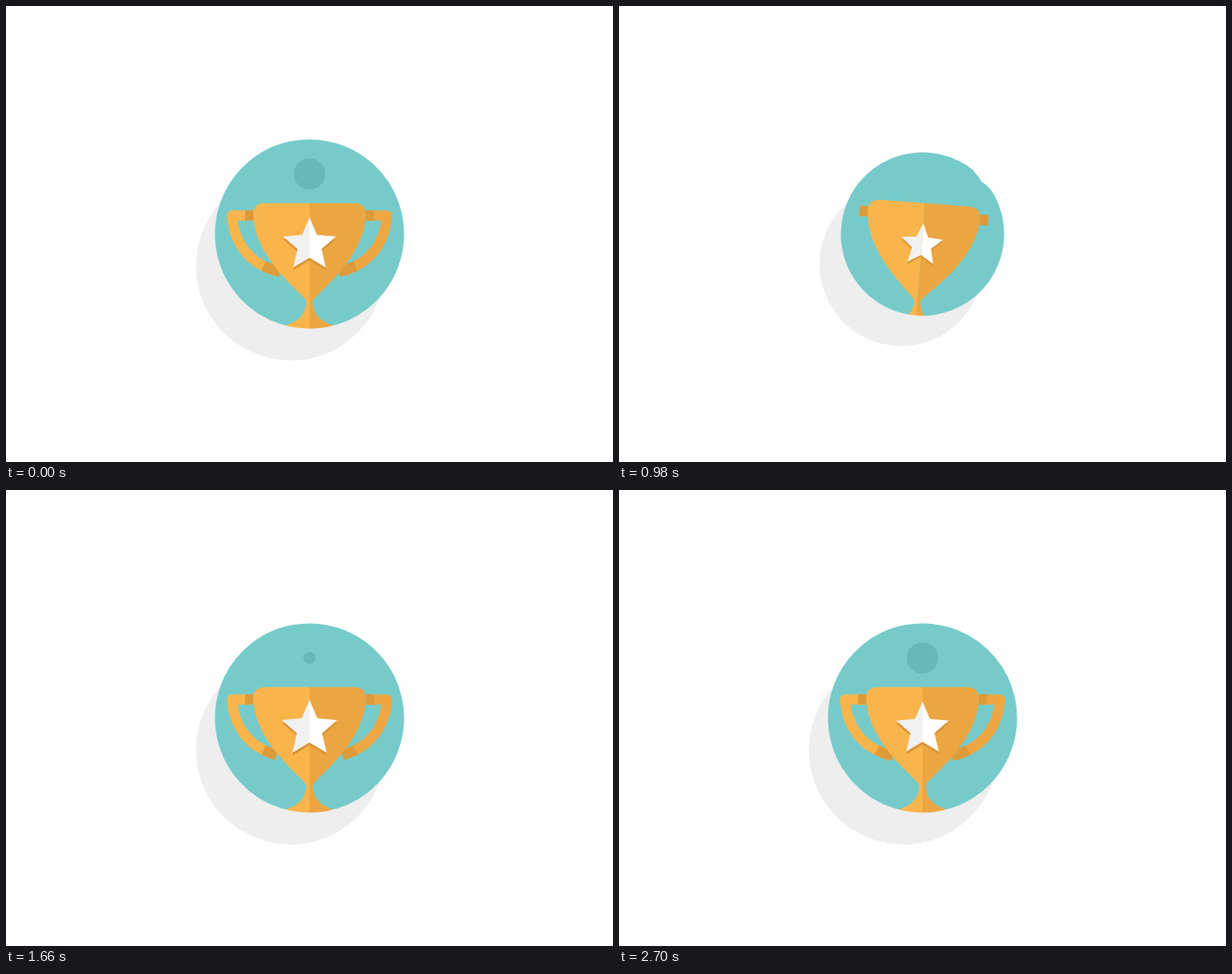
Write an HTML page that moves like this. It is 658x494 px and loops after 4700 ms.

```html
<!DOCTYPE html>
<html lang="en">
<head>
<meta charset="utf-8">
<title>Trophy badge</title>
<style>
  html, body { margin: 0; width: 100%; height: 100%; overflow: hidden; background: #fefefe; }
  svg { display: block; width: 100%; height: 100%; }
  .handle { fill: none; stroke-width: 11; stroke-linejoin: round; }
  .light { stroke: #f9b54b; }
  .right .light { stroke: #eda641; }
  .dark { stroke: #dd9b39; }
</style>
</head>
<body>
<svg viewBox="0 0 658 494">
  <defs>
    <path id="disc" fill="none" stroke-linecap="round"/>
    <mask id="badge" maskUnits="userSpaceOnUse" x="0" y="0" width="658" height="494">
      <use href="#disc" stroke="#fff"/>
    </mask>
    <path id="half" d="M329 213.5H281Q268 213.5 268 226C269 262 297 291 322 315Q326 319 325.500 322C324 337 314 343 300 347V356H329Z"/>
    <path id="starHalf"/>
  </defs>

  <use id="shadow" href="#disc" stroke="#eee"/>
  <g mask="url(#badge)">
    <rect x="200" y="130" width="260" height="240" fill="#76cbca"/>
    <circle id="mark" cx="329" cy="182" r="17" fill="#66b9b7"/>
    <g id="trophy">
      <g class="left">
        <path class="handle light" pathLength="100" d="M268 227H245C247 255 262 280 297 288"/>
        <path class="handle dark" pathLength="100" d="M268 227H245C247 255 262 280 297 288"/>
      </g>
      <g class="right" transform="matrix(-1 0 0 1 658 0)">
        <path class="handle light" pathLength="100" d="M268 227H245C247 255 262 280 297 288"/>
        <path class="handle dark" pathLength="100" d="M268 227H245C247 255 262 280 297 288"/>
      </g>
      <use href="#half" fill="#f9b54b"/>
      <use href="#half" fill="#eca641" transform="matrix(-1 0 0 1 658 0)"/>
      <g id="star">
        <g fill="#d99639" transform="translate(0 3)">
          <use href="#starHalf"/>
          <use href="#starHalf" transform="scale(-1 1)"/>
        </g>
        <use href="#starHalf" fill="#f1f1f1"/>
        <use href="#starHalf" fill="#fff" transform="scale(-1 1)"/>
      </g>
    </g>
  </g>
</svg>
<script>
  const LOOP = 4700, START = 500, STEP = 40, END = 2700;
  const CX = 329, CY = 247;
  const $ = id => document.getElementById(id);
  const lights = document.querySelectorAll('.light');
  const darks = document.querySelectorAll('.dark');

  const mix = (a, b, k) => a + (b - a) * k;
  const span = (t, a, b) => Math.min(1, Math.max(0, (t - a) / (b - a)));
  const out = (x, p) => 1 - Math.pow(1 - x, p);
  const polar = (r, deg) => {
    const a = deg * Math.PI / 180;
    return [r * Math.cos(a), r * Math.sin(a)];
  };
  const put = (el, attrs) => {
    for (const k in attrs) el.setAttribute(k, attrs[k]);
  };

  // Left half of a five-pointed star, tip first
  const corners = [];
  for (let i = 0; i <= 5; i++) corners.push(polar(i % 2 ? 13.7 : 30, -90 - i * 36));
  put($('starHalf'), { d: 'M' + corners.map(p => p.join(' ')).join('L') + 'Z' });

  // The disc is a fat arc that closes and widens until it fills itself
  function drawDisc(t) {
    const x = span(t, START, 1580);
    const size = mix(21, 102.5, out(x, 3));
    const r = size * mix(0.81, 0.495, span(x, 0, 0.4));
    const turn = out(x, 4);
    const from = mix(100, -40, turn);
    const to = mix(140, 319.9, turn);
    const [ax, ay] = polar(r, from);
    const [bx, by] = polar(r, to);
    const large = to - from > 180 ? 1 : 0;
    put($('disc'), {
      d: `M${CX + ax} ${CY + ay}A${r} ${r} 0 ${large} 1 ${CX + bx} ${CY + by}`,
      'stroke-width': 2 * (size - r)
    });
    return 45 * (1 - turn);
  }

  function starScale(t) {
    if (t < 980) return 0.79;
    if (t < 1340) return mix(0.79, 0.88, span(t, 980, 1340));
    if (t < 1660) return mix(0.88, 1.05, out(span(t, 1340, 1660), 2));
    return mix(1.05, 1, span(t, 1660, 2100));
  }

  function drawHandles(t) {
    const v = mix(8, 100, out(span(t, 980, 2000), 3));
    const tail = Math.max(0, v - 83);
    lights.forEach(el => put(el, { 'stroke-dasharray': `${v} 200` }));
    darks.forEach(el => put(el, {
      'stroke-dasharray': tail ? `8 75 ${tail} 200` : '8 200'
    }));
  }

  function draw(t) {
    const tilt = drawDisc(t);
    const [sx, sy] = polar(40.1, 120.7 + tilt);
    put($('shadow'), { transform: `translate(${sx} ${sy})` });

    const grow = out(span(t, START, 960), 3);
    const s = mix(0.1, 1, grow);
    const dx = mix(6, 0, grow), dy = mix(12, 0, grow);
    put($('trophy'), {
      transform: `translate(${CX + dx} ${CY + dy}) rotate(${tilt}) scale(${s}) translate(${-CX} ${-CY})`
    });
    put($('star'), { transform: `translate(329 259) scale(${starScale(t)})` });
    drawHandles(t);
    put($('mark'), { r: 17 * span(t, 1260, 2260) });
  }

  const begin = performance.now();
  function tick() {
    const t = (performance.now() - begin) % LOOP;
    const step = START + Math.floor((t - START) / STEP) * STEP;
    draw(t < START || t >= END ? END : step);
    requestAnimationFrame(tick);
  }
  tick();
</script>
</body>
</html>
```
